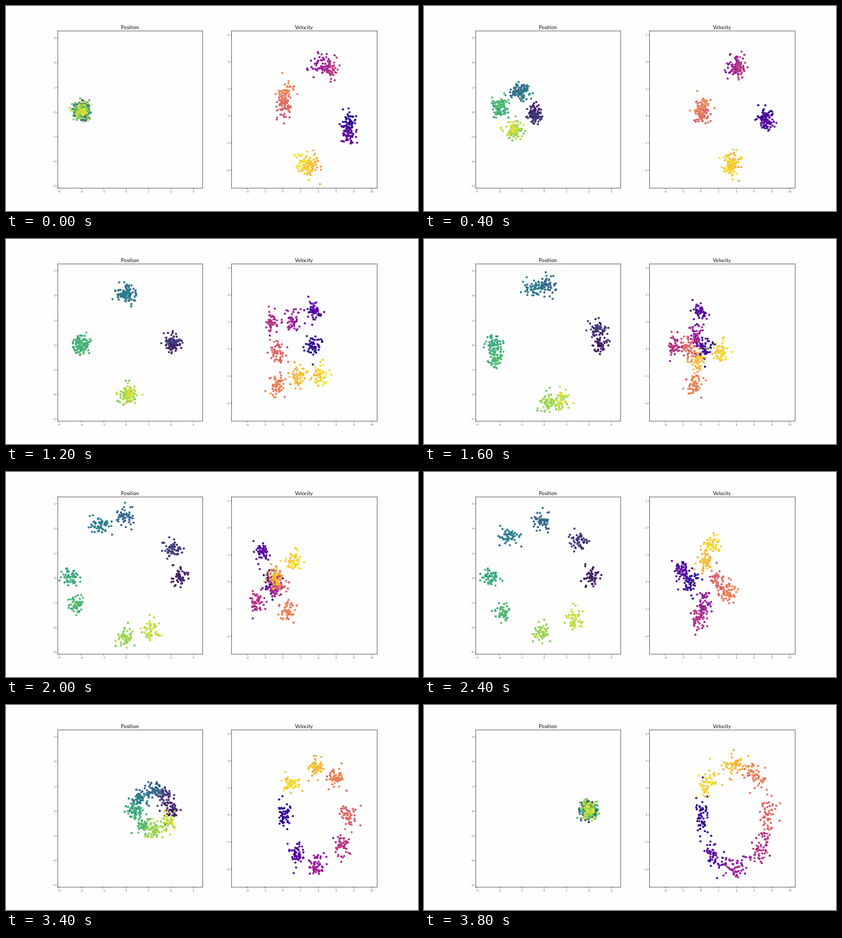
Animation of 600x300 px, one loop 4 s. Source, as an HTML page with a canvas:

```html
<!DOCTYPE html>
<html lang="en">
<head>
<meta charset="utf-8">
<title>Position and velocity</title>
<style>
html, body { margin: 0; width: 600px; height: 300px; overflow: hidden; background: #fefefe; }
canvas { display: block; }
</style>
</head>
<body>
<canvas id="stage" width="600" height="300"></canvas>
<script>
const ctx = document.getElementById('stage').getContext('2d');
const LOOP = 4000, STEP = 200, UNIT = 950; // ms; UNIT is one unit of model time
const GROUPS = 8, PER_GROUP = 54, TOP = 36.4, BOTTOM = 266.7;
const { PI, sin, cos } = Math;

const posPlot = { title: 'Position', left: 75.3, right: 286.6, x0: 175, y0: 155.3, sx: 16.33, sy: 18.1, xs: [-6, 6], ys: [-6, 6] };
const velPlot = { title: 'Velocity', left: 328.5, right: 540.4, x0: 403, y0: 161, sx: 12.95, sy: 19.8, xs: [-4, 10], ys: [-4, 6] };

const viridis = [[68, 1, 84], [59, 82, 139], [33, 145, 140], [94, 201, 98], [253, 231, 37]];
const plasma = [[13, 8, 135], [126, 3, 168], [204, 71, 120], [248, 149, 64], [240, 249, 33]];

let seed = 71;
function random() {
  seed = (seed * 1664525 + 1013904223) >>> 0;
  return (seed + 0.5) / 4294967296;
}
const gauss = () => Math.sqrt(-2 * Math.log(random())) * cos(2 * PI * random());
const clamp = v => Math.max(0, Math.min(1, v));

function sample(map, u) {
  const i = Math.min(3, Math.floor(u * 4)), f = u * 4 - i;
  return `rgb(${map[i].map((c, k) => Math.round(c + (map[i + 1][k] - c) * f)).join(',')})`;
}

const dots = Array.from({ length: GROUPS * PER_GROUP }, (_, i) => {
  const g = i % GROUPS, pair = g >> 1, odd = g & 1;
  const shade = odd * 0.35 + random() * 0.65;
  const u = (pair + shade * 0.92) / 4;
  return {
    pair, odd, shade, u,
    stray: gauss(),
    noise: Array.from({ length: 8 }, gauss),
    posColor: sample(viridis, u),
    velColor: sample(plasma, u)
  };
}).sort((a, b) => a.u - b.u);

// A ring that opens and closes while its middle drifts from left to right.
// Four clusters leave the start; the odd half of each later turns away.
function path(d, t) {
  const radius = 4.85 * sin(PI * t / 4);
  const middle = -4 + 2 * t + 1.53 * sin(PI * t / 2) - 0.19 * sin(PI * t);
  const degrees = 90 * d.pair
    - 32 * d.shade * clamp(1 - t / 1.26)
    + 52 * d.odd * clamp((t - 1.2) / 1.7)
    + 9 * d.stray * clamp(t - 3);
  const angle = degrees * PI / 180;
  return [middle + radius * cos(angle), 0.1 + radius * sin(angle)];
}

function slope(d, t) {
  const e = 0.02, a = path(d, t - e), b = path(d, t + e);
  return [(b[0] - a[0]) / (2 * e), (b[1] - a[1]) / (2 * e)];
}

function dot(plot, [x, y], dx, dy, color) {
  ctx.fillStyle = color;
  ctx.beginPath();
  ctx.arc(plot.x0 + x * plot.sx + dx, plot.y0 - y * plot.sy + dy, 1.6, 0, 2 * PI);
  ctx.fill();
}

function drawAxes(p) {
  ctx.strokeStyle = '#555';
  ctx.lineWidth = 0.75;
  ctx.strokeRect(p.left, TOP, p.right - p.left, BOTTOM - TOP);
  ctx.fillStyle = '#111';
  ctx.font = '7.4px Lato, sans-serif';
  ctx.textAlign = 'center';
  ctx.textBaseline = 'alphabetic';
  ctx.fillText(p.title, (p.left + p.right) / 2 - 0.6, 33.7);

  ctx.font = '4.2px "Liberation Serif", serif';
  ctx.fillStyle = '#444';
  ctx.beginPath();
  const label = v => String(v).replace('-', '\u2212');
  for (let v = p.xs[0]; v <= p.xs[1]; v += 2) {
    const x = p.x0 + v * p.sx;
    ctx.moveTo(x, BOTTOM);
    ctx.lineTo(x, BOTTOM + 1.8);
    ctx.fillText(label(v), x, 272.7);
  }
  ctx.textAlign = 'right';
  for (let v = p.ys[0]; v <= p.ys[1]; v += 2) {
    const y = p.y0 - v * p.sy;
    ctx.moveTo(p.left, y);
    ctx.lineTo(p.left - 1.8, y);
    ctx.fillText(label(v), p.left - 3.3, y + 1.4);
  }
  ctx.stroke();
}

function draw(ms) {
  ctx.fillStyle = '#fefefe';
  ctx.fillRect(0, 0, 600, 300);
  drawAxes(posPlot);
  drawAxes(velPlot);

  const t = ms / UNIT, c = cos(ms / 1500), s = sin(ms / 1500);
  const spread = 0.82 + 0.18 * sin(PI * t / 4);
  for (const d of dots) {
    const wobble = k => d.noise[k] * c + d.noise[k + 1] * s;
    dot(posPlot, path(d, t), wobble(0) * 6.5 * spread, wobble(2) * 7.2 * spread, d.posColor);
    dot(velPlot, slope(d, t), wobble(4) * 6, wobble(6) * 7.8, d.velColor);
  }
}

function frame() {
  const ms = performance.now() % LOOP;
  draw(Math.floor(ms / STEP) * STEP);
  requestAnimationFrame(frame);
}
frame();
</script>
</body>
</html>
```
